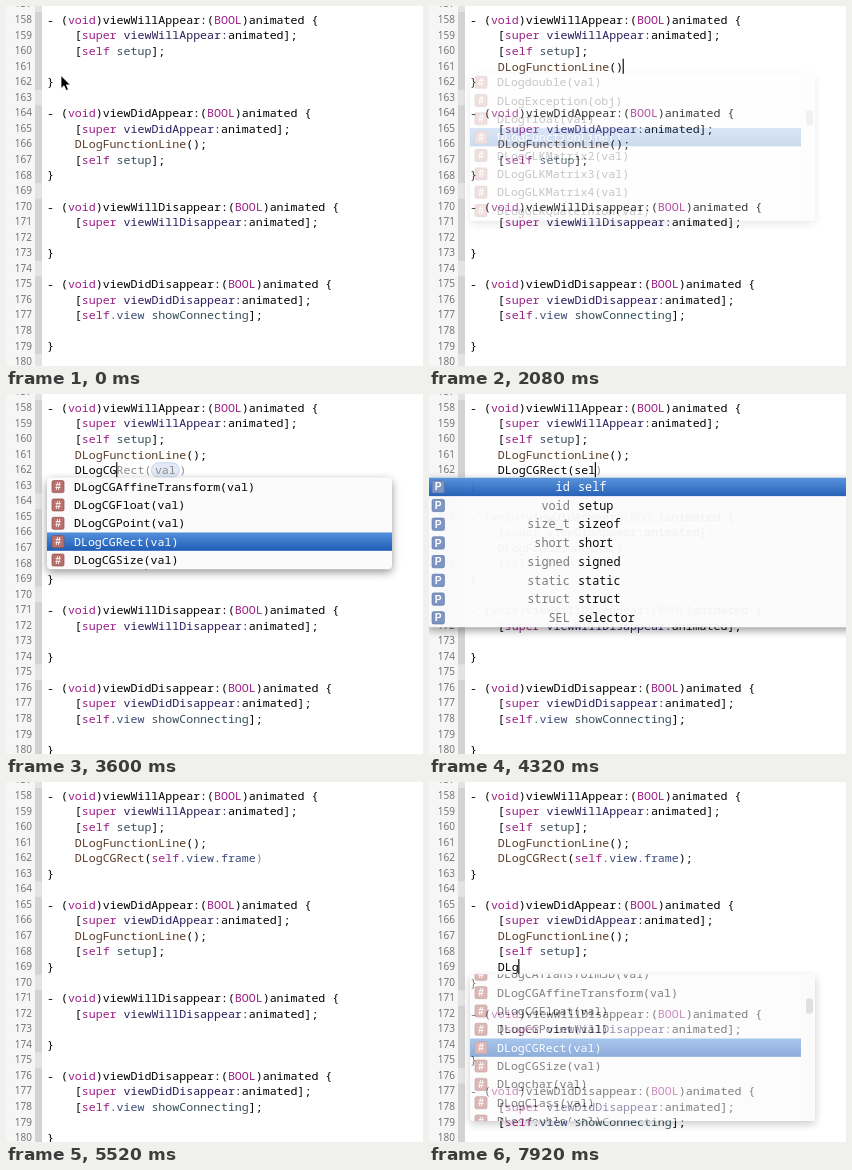
An HTML page that plays this animation: 417 px wide and 360 px high, repeating every 8 s.

```html
<!DOCTYPE html>
<html lang="en">
<head>
<meta charset="utf-8">
<title>Code completion</title>
<style>
  html, body { margin: 0; width: 100%; height: 100%; overflow: hidden; background: #fff; }
  svg { display: block; }
  #stage { width: 100vw; height: 100vh; }
  text { font: 500 11.6px "Noto Sans Mono", "DejaVu Sans Mono", monospace; white-space: pre; fill: #000; }
  .num { font: 10px "Open Sans", "Noto Sans", sans-serif; fill: #6c6c6c; text-anchor: end; }
  .key { fill: #9a1f85; }
  .macro { fill: #5a3a26; }
  .own { fill: #37505a; }
  .sys { fill: #2c1c5c; }
  .prop { fill: #3c4a78; }
  .ghost { fill: #8c8c8c; }
  .type { fill: #777; text-anchor: end; }
  .sel { fill: #fff; }
  .icon { font: bold 10px "Liberation Sans", Arial, sans-serif; fill: #fff; text-anchor: middle; }
  .shadow { filter: drop-shadow(0 3px 4px rgba(0, 0, 0, .42)); }
</style>
</head>
<body>
<svg id="stage" viewBox="0 0 417 360" preserveAspectRatio="none"></svg>
<script>
const stage = document.getElementById('stage');
const LOOP = 8000, STEP = 80;
const CH = 6.96, LINE = 15.55, LEFT = 41, BODY = LEFT + 4 * CH, ROW = 18.35;
const midY = i => 13.8 + i * LINE;

const at = (keys, t) => keys.filter(k => k[0] <= t).pop();
const within = (t, ranges) => ranges.some(([a, b]) => t >= a && t < b);
const rect = (x, y, w, h, attrs) =>
  `<rect x="${x}" y="${y}" width="${w}" height="${h}" ${attrs}/>`;
const text = (x, y, s, cls = '') => `<text x="${x}" y="${y}" class="${cls}">${s}</text>`;

const method = (name, ...body) =>
  [`- (void)${name}:(BOOL)animated {`, `    [super ${name}:animated];`, ...body, '}'];
const SETUP = '    [self setup];';
const LOG = '    DLogFunctionLine();';

// [time, typed text, suggested rest]
const call = 'DLogCGRect(';
const first = [
  [0, ''], [1040, '', 'DLogFunctionLine()'],
  [2000, 'DLogFunctionLine()'], [2560, 'DLogFunctionLine();']
];
const second = [
  [2800, ''], [3040, 'D'], [3120, 'DL'], [3200, 'DLo', 'gCGRect(val)'],
  [3280, 'DLog', 'CGRect(val)'], [3360, 'DLogC', 'GRect(val)'], [3440, 'DLogCG', 'Rect(val)'],
  [3840, call, 'val)'], [4160, call + 's', ')'], [4240, call + 'se', ')'],
  [4320, call + 'sel', ')'], [4480, call + 'self', ')'], [4640, call + 'self.', ')'],
  [4720, call + 'self.', 'class)'], [4960, call + 'self.v', 'iew)'],
  [5040, call + 'self.view', ')'], [5120, call + 'self.view.', ')'],
  [5200, call + 'self.view.f', 'rame)'], [5280, call + 'self.view.fr', 'ame)'],
  [5360, call + 'self.view.frame', ')'], [5600, call + 'self.view.frame)'],
  [5760, call + 'self.view.frame);']
];
const third = [
  [7280, ''], [7600, 'D'], [7680, 'DL'], [7760, 'DL', 'ogCGRect(val)'], [7920, 'DLg']
];

const val = s => s + '(val)';
const macros = [
  ...['CATransform3D', 'CGAffineTransform', 'CGFloat', 'CGPoint', 'CGRect', 'CGSize',
    'char', 'Class', 'double'].map(val),
  'Exception(obj)', 'float(val)', 'FunctionLine()',
  ...['GLKMatrix2', 'GLKMatrix3', 'GLKMatrix4', 'GLKQuaternion'].map(val)
].map(s => 'DLog' + s);
const words = ['id|self', 'void|setup', 'size_t|sizeof', 'short|short',
  'signed|signed', 'static|static', 'struct|struct', 'SEL|selector'];
const props = ['Class|class', 'NSString *|debugDescription', 'NSString *|description',
  'NSUInteger|hash', 'BOOL|isViewLoaded', 'id|self', 'NSString *|title', 'UIView *|view'];

const popups = [
  { from: 1040, to: 2000, line: 3, items: macros, sel: 11, off: 8.05, bar: true },
  { from: 3120, to: 3600, line: 4, items: macros, sel: 4, off: .5, bar: true, cut: true },
  { from: 3600, to: 3840, line: 4, items: macros.slice(1, 6), sel: 3, cut: true, still: true },
  { from: 4160, to: 4480, line: 4, items: words, sel: 0, x: -2, w: 422, label: 146 },
  { from: 4800, to: 5200, line: 4, items: props, sel: 0, x: -2, w: 422, label: 182 },
  { from: 7680, to: 7920, line: 11, items: macros, sel: 4, off: .5, bar: true }
];

function highlight(s, plain) {
  const callLine = s.trim()[0] === '[';
  return s.replace(/\b(void|BOOL|super|self)\b|DLog\w+|\b(setup|showConnecting)\b|view(Will|Did)\w+:?|\.(view|frame)\b/g, m => {
    let cls = 'key';
    if (m.startsWith('DLog')) cls = plain ? '' : 'macro';
    else if (m === 'setup' || m === 'showConnecting') cls = 'own';
    else if (m[0] === '.') cls = 'prop';
    else if (/^view/.test(m)) cls = callLine ? 'sys' : '';
    return `<tspan class="${cls}">${m}</tspan>`;
  });
}

function editLine(i, [time, typed, rest = ''], plain) {
  const y = midY(i);
  let out = '', tail = rest;
  const n = rest.indexOf('val)');
  if (n >= 0) {
    const active = time === 3840;
    out += rect(BODY + (typed.length + n) * CH, y - 7.2, 3 * CH + 7, 14.4,
      active ? 'rx="7" fill="#6f93cf"' : 'rx="7" fill="#e1eaf6" stroke="#bfd0e8" stroke-width=".8"');
    tail = rest.slice(0, n) +
      `<tspan dx="3.5" class="${active ? 'sel' : 'ghost'}">val</tspan><tspan dx="3.5">)</tspan>`;
  }
  return out + text(BODY, y + 4.1, highlight(typed, plain) + `<tspan class="ghost">${tail}</tspan>`);
}

function popup(p, t) {
  const kIn = (t - p.from) / STEP, kOut = (t - p.to) / STEP;
  let alpha = 1, scale = 1;
  if (kOut >= 0) alpha = p.cut ? 0 : [.5, .22][kOut] || 0;
  else if (kIn < 0) alpha = 0;
  else if (!p.still) {
    alpha = [.35, .8, .96][kIn] || 1;
    scale = [.97, 1, 1.02, 1.01][kIn] || 1;
  }
  if (!alpha) return '';
  const { x = LEFT, w = 345, off = 0, items, label } = p;
  const y = midY(p.line) + 7.4;
  const h = Math.min(8, items.length) * ROW;
  const sel = items === props && t >= 4960 ? 7 : p.sel;
  const rowW = p.bar ? w - 14 : w;
  const tx = label ? label - x : 27;
  let rows = '';
  items.forEach((item, i) => {
    const top = (i - off) * ROW;
    if (top < -ROW || top > h) return;
    const on = i === sel, [name, type] = item.split('|').reverse();
    const base = top + ROW / 2 + 4.1;
    if (on) rows += rect(0, top, rowW, ROW, 'fill="url(#blue)"');
    rows += rect(5, top + 3.2, 12, 12, `rx="1.5" fill="${label ? '#7a93c4' : '#b9716d'}" stroke="${label ? '#566fa3' : '#8f4d4a'}" stroke-width=".7"`);
    rows += text(11, top + 12.8, label ? 'P' : '#', 'icon');
    if (type) rows += text(tx - 8, base, type, on ? 'type sel' : 'type');
    rows += text(tx, base, name, on ? 'sel' : '');
  });
  if (p.bar) {
    rows += rect(rowW, 0, 14, h, 'fill="#f8f8f8"') +
      rect(rowW + 5, 24 + (off - .5) * 1.6, 7, 15.6, 'rx="3" fill="#c2c2c2"');
  }
  return `<g opacity="${alpha}" transform="translate(${x} ${y}) scale(${scale})">` +
    rect(0, 0, w, h, 'rx="4" fill="#fbfbfb" class="shadow"') +
    `<svg width="${w}" height="${h}" overflow="hidden">${rows}</svg></g>`;
}

function pointer(t) {
  let pos;
  if (t < 1040) {
    const k = Math.min(1, Math.max(0, (t - 160) / 400));
    pos = [55 + 12 * k, 69.5 - 11 * k];
  } else if (t >= 6240 && t < 7280) {
    pos = at([[6240, 256, 78], [6320, 254, 96], [6400, 252, 112], [6560, 256, 130],
      [6720, 190, 156], [6800, 162, 163]], t).slice(1);
  } else return '';
  return `<path transform="translate(${pos})" d="M0 0V13L3 10.2L5.2 15L7.4 14L5.4 9.4H9.4Z" fill="#000" stroke="#fff" stroke-width=".8"/>`;
}

function caret(t) {
  if (t < 560 || within(t, [[1600, 1840], [3840, 4160], [5520, 5600]])) return '';
  let line = 3, keys = first;
  if (t >= 7280) [line, keys] = [11, third];
  else if (t >= 6720) [line, keys] = [10, [[0, SETUP.trim()]]];
  else if (t >= 2800) [line, keys] = [4, second];
  const x = BODY + at(keys, t)[1].length * CH;
  return rect(x - .5, midY(line) - 7.8, 1.2, 15.2, 'fill="#111"');
}

function draw(t) {
  const added = t >= 2800, extra = t >= 7280;
  const blocks = [
    method('viewWillAppear', SETUP, first, ...(added ? [second] : [])),
    method('viewDidAppear', LOG, SETUP, ...(extra ? [third] : [])),
    method('viewWillDisappear', ''),
    method('viewDidDisappear', '    [self.view showConnecting];', '')
  ];
  let ribbon = rect(0, 0, 29, 360, 'fill="#f6f6f6"') + rect(29, 0, 7, 360, 'fill="#e3e3e3"');
  let code = '', nums = '', i = 0;
  for (const block of blocks) {
    ribbon += rect(29, midY(i) - LINE / 2, 7, block.length * LINE, 'fill="#d3d3d3"');
    for (const line of block) {
      code += Array.isArray(line)
        ? editLine(i, at(line, t), line === third || line === second && t < 5520)
        : text(LEFT, midY(i) + 4.1, highlight(line));
      i++;
    }
    i++;
  }
  for (let n = -1; n < 24; n++) nums += text(26, midY(n) + 3.2, 158 + n, 'num');

  stage.innerHTML =
    `<defs><linearGradient id="blue" x2="0" y2="1"><stop stop-color="#5490dc"/><stop offset="1" stop-color="#1f5cb5"/></linearGradient></defs>` +
    rect(0, 0, 417, 360, 'fill="#fff"') + ribbon + nums + code + caret(t) +
    popups.map(p => popup(p, t)).join('') + pointer(t);
}

let last = -1;
function tick() {
  const t = Math.floor(performance.now() % LOOP / STEP) * STEP;
  if (t !== last) draw(last = t);
  requestAnimationFrame(tick);
}
tick();
</script>
</body>
</html>
```
